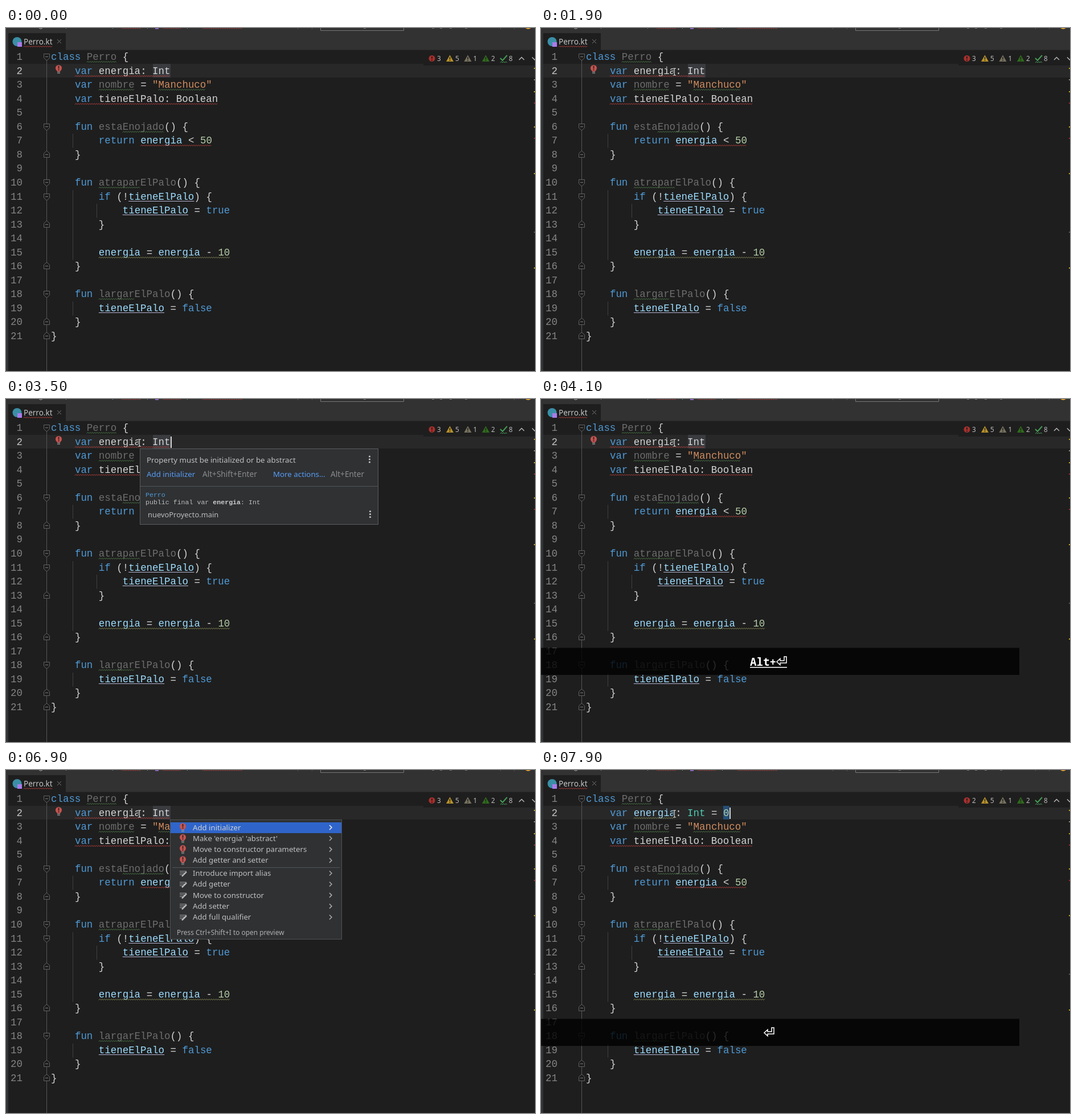
An HTML page with a canvas that plays this animation: 929 px wide and 603 px high, repeating every 8 s.

```html
<!DOCTYPE html>
<html lang="es">
<head>
<meta charset="utf-8">
<style>
html, body { margin: 0; width: 100%; height: 100%; overflow: hidden; background: #1e1e1e; }
canvas { display: block; width: 929px; height: 603px; }
</style>
</head>
<body>
<canvas id="stage" width="929" height="603"></canvas>
<script>
const ctx = document.getElementById('stage').getContext('2d');
const LOOP = 8000, CODE_SIZE = 17.46, CHAR = CODE_SIZE * 0.6001, CODE_X = 79;
const MONO = '"Liberation Mono", monospace', SANS = '"Noto Sans", sans-serif';
const C = { key: '#4f9ad6', text: '#d4d4d4', dim: '#6d6d6d', str: '#d08c60',
  num: '#b5cea8', ref: '#9cdcfe', type: '#4ec9b0', red: '#b5403c', green: '#4e7a4a', olive: '#858a55' };

const baseline = n => Math.round(56 + (n - 1) * 24.55);
const colX = col => CODE_X + col * CHAR;
const between = (t, a, b) => t >= a && t < b;

function rect(x, y, w, h, color) { ctx.fillStyle = color; ctx.fillRect(x, y, w, h); }

function text(s, x, y, color, size = 13.3, family = SANS, weight = '') {
  ctx.font = `${weight} ${size}px ${family}`;
  ctx.fillStyle = color;
  ctx.fillText(s, x, y);
}

function trace(points, closed) {
  ctx.beginPath();
  points.forEach(([x, y]) => ctx.lineTo(x, y));
  if (closed) ctx.closePath();
}

function line(points, color, width = 1, closed = false) {
  trace(points, closed);
  ctx.strokeStyle = color;
  ctx.lineWidth = width;
  ctx.stroke();
}

function shape(points, color) { trace(points, true); ctx.fillStyle = color; ctx.fill(); }

function disc(x, y, r, color) {
  ctx.beginPath();
  ctx.arc(x, y, r, 0, 7);
  ctx.fillStyle = color;
  ctx.fill();
}

function frame(x, y, w, h, fill, border) {
  rect(x, y, w, h, border);
  rect(x + 1, y + 1, w - 2, h - 2, fill);
}

function wave(x, y, width, color) {
  const points = [];
  for (let i = 0; i <= width; i += 2) points.push([x + i, y + (i % 4 ? -1 : 1)]);
  line(points, color);
}

// Each line: starting column, then color and text pairs.
const code = {
  1: [0, 'key', 'class ', 'dim', 'Perro', 'text', ' {'],
  3: [4, 'key', 'var ', 'dim', 'nombre', 'text', ' = ', 'str', '"Manchuco"'],
  4: [4, 'key', 'var ', 'text', 'tieneElPalo: Boolean'],
  6: [4, 'key', 'fun ', 'dim', 'estaEnojado', 'text', '() {'],
  7: [8, 'key', 'return ', 'ref', 'energia', 'text', ' < ', 'num', '50'],
  8: [4, 'text', '}'],
  10: [4, 'key', 'fun ', 'dim', 'atraparElPalo', 'text', '() {'],
  11: [8, 'key', 'if', 'text', ' (!', 'ref', 'tieneElPalo', 'text', ') {'],
  12: [12, 'ref', 'tieneElPalo', 'text', ' = ', 'key', 'true'],
  13: [8, 'text', '}'],
  15: [8, 'ref', 'energia', 'text', ' = ', 'ref', 'energia', 'text', ' - ', 'num', '10'],
  16: [4, 'text', '}'],
  18: [4, 'key', 'fun ', 'dim', 'largarElPalo', 'text', '() {'],
  19: [8, 'ref', 'tieneElPalo', 'text', ' = ', 'key', 'false'],
  20: [4, 'text', '}'],
  21: [0, 'text', '}'],
};
// line, column, length, color
const waves = [[1, 6, 5, 'green'], [3, 8, 6, 'green'], [3, 18, 8, 'green'], [4, 4, 24, 'red'],
  [6, 12, 7, 'green'], [7, 15, 12, 'red'], [10, 8, 7, 'green'], [15, 8, 22, 'olive'], [18, 8, 6, 'green']];
const underlines = [[11, 13], [12, 12], [19, 8]];

function codeLine(n, [col, ...tokens]) {
  for (let i = 0; i < tokens.length; i += 2) {
    text(tokens[i + 1], colX(col), baseline(n), C[tokens[i]], CODE_SIZE, MONO);
    col += tokens[i + 1].length;
  }
}

function codeWave(n, col, length, color) {
  wave(colX(col), baseline(n) + 3.5, length * CHAR, C[color]);
}

function bulb(x, y) {
  disc(x, y, 5.5, '#c75450');
  shape([[x - 4, y + 3], [x + 4, y + 3], [x + 2.5, y + 6], [x - 2.5, y + 6]], '#c75450');
  rect(x - 1, y - 4, 2, 5, '#3a2626');
  rect(x - 1, y + 2, 2, 2, '#3a2626');
  rect(x - 2.5, y + 6.5, 5, 1, '#999');
  rect(x - 2.5, y + 8.5, 5, 1, '#999');
}

function toolbar() {
  rect(0, 0, 929, 38, '#323232');
  rect(0, 38, 929, 1, '#2a2a2a');
  rect(0, 38, 4, 565, '#313335');
  rect(4, 9, 101, 30, '#1e1e1e');
  for (const [x, w] of [[203, 35], [275, 33], [345, 70]]) wave(x, 0.5, w, '#a03a37');
  for (const x of [105, 187, 248, 318]) line([[x, 1], [x + 2, -1]], '#999');
  line([[58, 0], [61, 1.5], [64, 0]], '#aaa');
  rect(262, 0, 6, 2, '#8a62b8');
  line([[552.5, 0], [552.5, 4.5], [698.5, 4.5], [698.5, 0]], '#777');
  for (const x of [512, 537, 868, 892]) rect(x, 0, 1, 2, '#555');
  for (const x of [628, 748, 762, 779, 806]) rect(x, 0, 4, 1, '#777');
  disc(917, -4, 6, '#e0a030');
  disc(19.5, 24, 8, '#3a8fa6');
  rect(20, 25, 8, 8, '#a97bea');
  text('Perro.kt', 31, 29, '#c4c4c4', 13.5);
  wave(31, 32.5, 51, '#b5403c');
  line([[90, 20], [97, 27]], '#777');
  line([[97, 20], [90, 27]], '#777');
}

function gutter() {
  ctx.textAlign = 'right';
  for (let n = 1; n <= 21; n++)
    text(n, 29, baseline(n), n === 2 ? '#c6c6c6' : '#858585', CODE_SIZE, MONO);
  ctx.textAlign = 'left';
  rect(71, 45, 1, 558, '#555');
  const marks = { 1: 1, 6: 1, 10: 1, 11: 1, 18: 1, 8: -1, 13: -1, 16: -1, 20: -1, 21: -1 };
  for (const [n, dir] of Object.entries(marks)) {
    const y = baseline(+n) - 5.5;
    const outline = [[-5, -5], [5, -5], [5, 2], [1, 6], [-1, 6], [-5, 2]].map(([a, b]) => [71.5 + a, y + b * dir]);
    shape(outline, '#1e1e1e');
    line(outline, '#606060', 1, true);
    line([[69, y], [74, y]], '#777');
  }
  for (const [col, from, to] of [[4, 7, 7], [4, 11, 15], [8, 12, 12], [4, 19, 19]])
    rect(Math.round(colX(col)) - 4, baseline(from) - 17, 1, (to - from + 1) * 24.55, '#404040');
}

function inspections(errors) {
  rect(733, 39, 196, 27, '#1e1e1e');
  disc(748, 53.5, 5.5, '#a82f2b');
  rect(747, 50, 2, 4, '#222');
  rect(747, 55.5, 2, 2, '#222');
  for (const [x, color] of [[779.5, '#b8922a'], [811, '#77715f'], [842.5, '#2f6b1c']]) {
    shape([[x, 47.5], [x + 6.5, 59], [x - 6.5, 59]], color);
    rect(x - 0.8, 51, 1.6, 4, '#222');
    rect(x - 0.8, 56, 1.6, 1.6, '#222');
  }
  line([[868, 53], [872, 57], [880, 48]], '#459b55', 2);
  wave(868, 60, 12, '#459b55');
  [errors, 5, 1, 2, 8].forEach((n, i) => text(n, [757, 789, 820.5, 852, 883][i], 58, '#bbb', 11.8));
  line([[901, 56], [905.5, 51.5], [910, 56]], '#bbb', 1.4);
  line([[924, 51.5], [928.5, 56], [933, 51.5]], '#bbb', 1.4);
}

function stripe() {
  const marks = { 70: '#c99a1e', 90: '#8a8a72', 111: '#c99a1e', 131: '#9e2927', 173: '#c99a1e',
    193: '#9e2927', 255: '#c99a1e', 358: '#4d5b4d', 421: '#c99a1e' };
  for (const y in marks) rect(927, +y, 2, 2, marks[y]);
}

function kebab(x, y) { for (const d of [-5, 0, 5]) disc(x, y + d, 1.6, '#c4c4c4'); }

function hint() {
  frame(235, 87, 419, 134, '#2f3133', '#5a5d5f');
  rect(236, 153, 417, 1, '#535658');
  text('Property must be initialized or be abstract', 247, 112, '#c0c0c0');
  text('Add initializer', 247, 137, '#589df6');
  text('Alt+Shift+Enter', 345, 137, '#8c8c8c', 13.6);
  text('More actions...', 469, 137, '#589df6');
  text('Alt+Enter', 570, 137, '#8c8c8c', 13.6);
  text('Perro', 245, 172, '#4f9ad6', 11.6, MONO);
  text('public final var ', 245, 185, '#bbb', 11.6, MONO);
  text('energia', 245 + 17 * 6.96, 185, '#ccc', 11.6, MONO, 'bold');
  text(': Int', 245 + 24 * 6.96, 185, '#bbb', 11.6, MONO);
  text('nuevoProyecto.main', 249, 208, '#bbb', 12.9);
  kebab(638.5, 106);
  kebab(639.5, 202.5);
}

function pencil(x, y) {
  for (const d of [-4, -1, 2]) line([[x - 6, y + d], [x + 2 - d, y + d]], '#aaa');
  line([[x - 2, y + 5], [x + 6, y - 3]], '#bbb', 2.4);
}

const actions = ['Add initializer', "Make 'energia' 'abstract'", 'Move to constructor parameters',
  'Add getter and setter', 'Introduce import alias', 'Add getter', 'Move to constructor',
  'Add setter', 'Add full qualifier'];

function menu() {
  frame(288, 87, 302, 211, '#2f3133', '#505254');
  rect(289, 92, 300, 19, '#2f65ca');
  rect(292, 171, 294, 1, '#535658');
  actions.forEach((label, i) => {
    const y = 101 + i * 19.3 + (i > 3 ? 3.3 : 0);
    i < 4 ? bulb(310.5, y - 2) : pencil(311, y + 0.5);
    text(label, 328, Math.round(y + 4.5), i ? '#c0c0c0' : '#d0d0d0', 13.2);
    line([[568, y - 4], [572, y], [568, y + 4]], i ? '#aaa' : '#eee', 1.5);
  });
  text('Press Ctrl+Shift+I to open preview', 300, 290, '#b0b0b0', 11.9);
}

function returnKey(x) {
  line([[18, 453], [18, 464], [7, 464], [7, 467.5], [1, 462], [7, 456.5], [7, 460], [14, 460], [14, 453]]
    .map(([a, y]) => [x + a, y]), '#fff', 1.5, true);
}

function keyBar(label, keyX, fresh) {
  rect(0, 437.5, 840, 47.5, 'rgba(0,0,0,.8)');
  const start = label ? 367 : keyX;
  text(label, start, 469, '#fff', 19.2, '"Noto Sans Mono", monospace', 'bold');
  returnKey(keyX);
  if (fresh) rect(start, 471, keyX + 19 - start, 1.5, '#fff');
}

function pointer(t) {
  if (t < 700) return;
  const p = Math.min(1, Math.floor((t - 700) / 100) / 8), ease = p * p * (3 - 2 * p);
  const x = 578 + (234.5 - 578) * ease, y = 77 * ease;
  if (y < 39) {
    const arrow = [[0, 0], [0, 13], [3, 10], [6, 15], [8, 14], [5.5, 9.5], [9, 9]].map(([a, b]) => [x + a, y + b]);
    shape(arrow, '#111');
    line(arrow, '#eee', 1, true);
    return;
  }
  for (const [color, width] of [['#111', 3], ['#eee', 1.1]]) {
    line([[x, y - 6], [x, y + 6]], color, width);
    line([[x - 2.5, y - 6], [x + 2.5, y - 6]], color, width);
    line([[x - 2.5, y + 6], [x + 2.5, y + 6]], color, width);
  }
}

function draw(t) {
  const inserted = t >= 7500, analyzed = t >= 7900;
  rect(0, 0, 929, 603, '#1e1e1e');
  toolbar();
  rect(4, 63, 925, 24, '#282828');
  if (inserted) rect(colX(23), 63, CHAR, 24, '#264f78');
  else rect(258, 63, 31, 24, '#393b3f');
  gutter();
  for (const n in code) codeLine(+n, code[n]);
  codeLine(2, [4, 'key', 'var ', analyzed ? 'ref' : 'text', 'energia', 'text', ': ',
    analyzed ? 'type' : 'text', 'Int', ...(inserted ? ['text', ' = ', 'num', '0'] : [])]);
  waves.forEach(w => codeWave(...w));
  analyzed ? codeWave(2, 8, 7, 'olive') : codeWave(2, 4, 16, 'red');
  for (const [n, col] of underlines) rect(colX(col), baseline(n) + 2, 11 * CHAR, 1, '#b5b5d4');
  if (!inserted) bulb(92.5, 70.5);
  inspections(analyzed ? 2 : 3);
  stripe();

  const blink = [[400, 900], [1400, 1900], [2400, 3000], [3500, 4100]];
  if (blink.some(([a, b]) => between(t, a, b))) rect(289, 66, 2, 20, '#d8d8d8');
  if (inserted) rect(331, 66, 2, 20, '#d8d8d8');

  if (between(t, 2100, 4100)) hint();
  if (between(t, 4200, 7400)) menu();
  if (between(t, 4100, 6900)) keyBar('Alt+', 413, t < 4300);
  if (t >= 7300) keyBar('', 391, t < 7700);
  pointer(t);
}

const start = performance.now();
function tick() {
  draw((performance.now() - start) % LOOP);
  requestAnimationFrame(tick);
}
tick();
</script>
</body>
</html>
```
